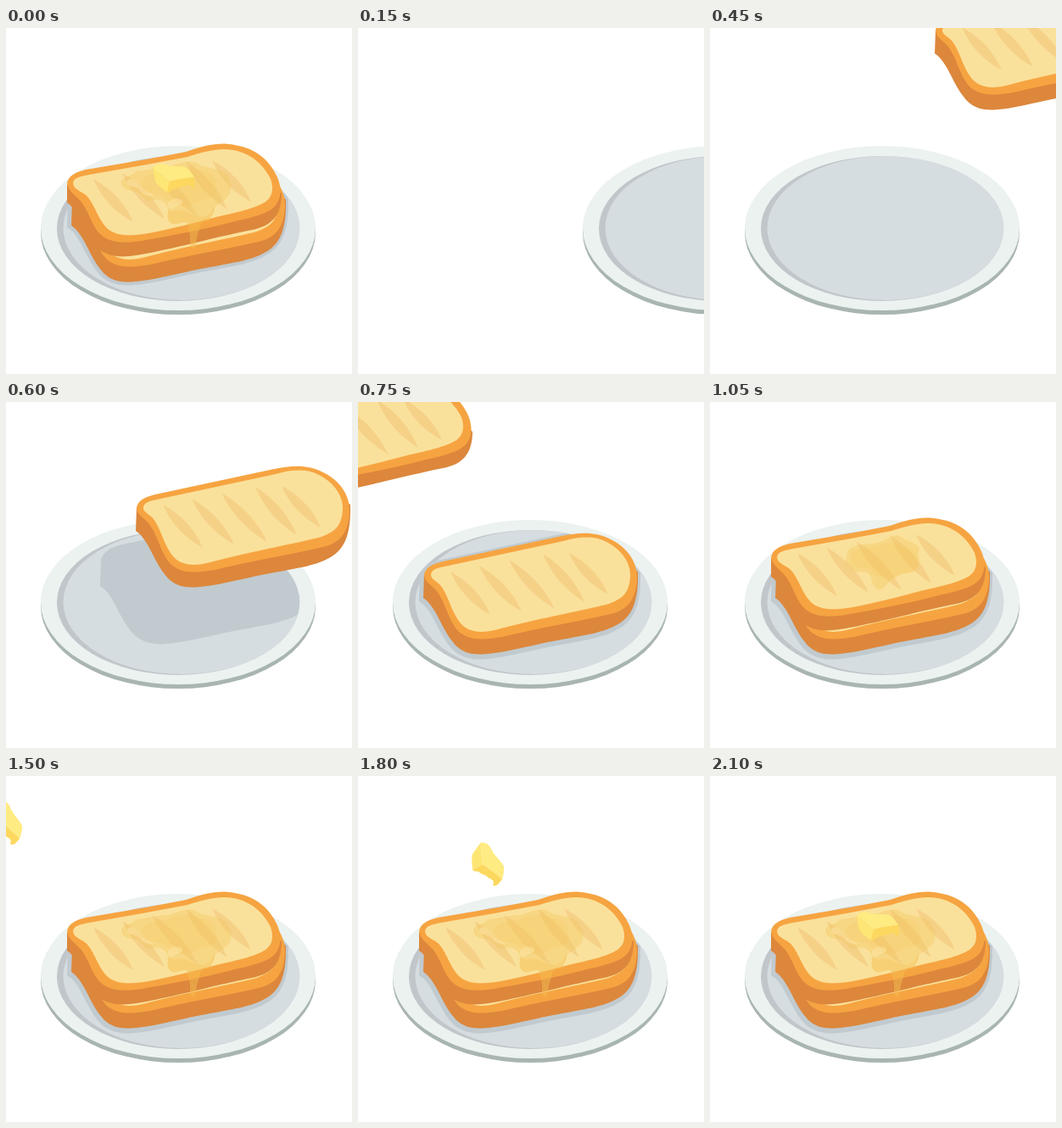
These frames come from a looping animation (408x408 px, 2650 ms). An HTML page with a canvas:

```html
<!DOCTYPE html>
<html lang="en">
<head>
<meta charset="utf-8">
<title>Toast</title>
<style>
html, body { margin: 0; width: 100%; height: 100%; overflow: hidden; background: #fff; }
canvas { display: block; width: 100vw; height: 100vh; }
</style>
</head>
<body>
<canvas id="stage" width="408" height="408"></canvas>
<script>
const ctx = document.getElementById('stage').getContext('2d');
const LOOP = 2650, STEP = 150, LAST = 14;

const lower = {
  crust: new Path2D('M78 204C79 195 88 191 100 188L240 158C262 153 282 153 298 162C317 171 330 189 329 208C328 231 320 243 302 249C270 257 210 267 170 277C145 281 130 281 118 270C107 258 104 240 95 226C89 216 79 214 78 204Z'),
  side: new Path2D('M78 203L77 231C92 241 97 264 111 282C121 296 135 299 152 297C170 296 195 289 230 282C268 275 288 272 303 264C322 255 331 238 330 200L300 180L100 195Z'),
  face: new Path2D('M86 204C86 198 92 196 102 194L242 164C263 158 280 158 293 165C311 174 322 190 321 206C320 226 311 232 296 238C260 247 205 257 165 268C145 273 131 272 121 261C111 249 108 233 100 220C95 211 86 210 86 204Z')
};
const upper = {
  crust: new Path2D('M72 184C73 174 82 170 94 167L165 155L212 146C235 138 252 134 270 138C296 142 312 158 320 176C325 188 325 200 318 209C308 221 285 224 262 230C235 237 195 245 165 250C140 255 122 253 112 244C102 235 100 222 91 208C85 199 75 195 72 184Z'),
  side: new Path2D('M72 185L72 206C86 215 89 238 103 254C113 267 128 271 146 269C185 264 240 248 290 238C312 234 325 222 325 195L300 172L95 178Z'),
  face: new Path2D('M79 183C80 176 88 175 98 173L166 161L214 152C236 145 252 141 268 144C290 148 304 162 312 178C316 190 314 199 306 205C290 215 262 219 240 225C210 233 185 239 162 243C140 246 128 244 119 236C109 226 106 212 97 200C91 192 80 192 79 183Z')
};
const grill = [[109, 200, 156, 251], [143, 193, 193, 247], [178, 186, 232, 244], [218, 179, 267, 236], [249, 178, 295, 227]];

const honey = {
  small: new Path2D('M161 183C162 168 177 168 190 167C205 166 212 157 222 157C230 164 241 164 247 172C244 181 250 189 244 197C239 204 224 201 217 207C209 213 207 220 200 221C192 221 192 212 189 205C184 197 176 204 168 197C162 193 159 189 161 183Z'),
  pool: new Path2D('M136 184C135 174 149 176 153 169C168 168 176 164 192 164C206 158 222 154 229 162C240 166 258 165 263 178C268 187 266 197 256 204C246 209 244 217 237 221C229 224 222 221 214 217C207 213 198 218 191 214C190 207 184 201 174 203C166 207 161 199 155 193C147 192 139 192 136 184Z'),
  inner: new Path2D('M161 182C162 171 179 171 192 169C209 162 221 162 226 168C242 168 249 175 247 186C253 194 244 201 233 202C222 205 219 213 209 210C200 207 194 209 189 201C184 194 177 199 171 195C163 193 160 188 161 182Z'),
  dripShort: new Path2D('M191 214C198 218 207 213 214 217C222 221 229 224 237 221C244 217 244 212 246 211C246 220 241 221 240 227C236 228 232 223 228 227C226 236 217 238 215 229C209 225 201 234 194 230C189 226 191 219 191 214Z'),
  dripLong: new Path2D('M191 214C198 218 207 213 214 217C222 221 229 224 237 221C244 217 244 212 246 211C246 220 241 221 240 227C236 228 232 226 229 233C227 243 225 242 224 256C222 262 217 261 217 253C218 243 215 239 214 230C207 227 201 234 194 230C189 226 191 219 191 214Z'),
  shine: new Path2D('M143 181C141 188 152 186 157 190C161 197 168 200 175 197C164 194 160 187 154 182C150 178 145 176 143 181ZM191 207C193 201 203 199 207 203C212 208 202 208 197 213C192 214 190 211 191 207Z')
};

const butter = {
  top: new Path2D('M-25-12C-22-16-17-18-11-16C-4-13 4-15 14-13C18-10 21-6 24-1C14 0 5 1-5 4Z'),
  left: new Path2D('M-25-12L-5 4L-8 17C-13 13-19 9-22 4Z'),
  front: new Path2D('M-5 4C5 1 15 0 24-1L25 7C24 12 21 13 20 9C17 7 14 9 11 10C7 9 4 13 0 13C-3 13-4 17-8 17Z')
};

// position of each piece per step, from the step it enters
const plateX = { 1: 224, 2: 75 };
const lowerAt = { 0: [0, 2], 3: [188, -201], 4: [76, -79] };
const upperAt = { 5: [-190, -160], 6: [-71, -71] };
const butterAt = { 10: [0, 56, 50], 11: [92, 81, 25], 12: [153, 105, 47], 13: [190, 157, 0] };
const rest = [0, 0];

function fill(color, path) {
  ctx.fillStyle = color;
  ctx.fill(path);
}

function at(x, y, draw) {
  ctx.save();
  ctx.translate(x, y);
  draw();
  ctx.restore();
}

function oval(x, y, rx, ry) {
  const p = new Path2D();
  p.ellipse(x, y, rx, ry, 0, 0, Math.PI * 2);
  return p;
}

const well = oval(203, 236.5, 143, 85.5);

function plate() {
  fill('#a9b5b2', oval(203, 241, 162, 97));
  fill('#ebf2f0', oval(203, 236, 162, 97));
  fill('#c0c6c9', well);
  fill('#d5dde1', oval(207, 236, 139.5, 85));
}

function slice(bread, dx, dy) {
  fill('#dc873c', bread.side);
  fill('#f6a441', bread.crust);
  fill('#fae19b', bread.face);
  ctx.fillStyle = '#f5d188';
  at(dx, dy, () => {
    for (const [x, y, u, v] of grill) {
      const mx = (x + u) / 2, my = (y + v) / 2;
      ctx.beginPath();
      ctx.moveTo(x, y);
      ctx.quadraticCurveTo(mx + 10, my - 7, u, v);
      ctx.quadraticCurveTo(mx - 10, my + 7, x, y);
      ctx.fill();
    }
  });
}

function plateShadow(x, y) {
  ctx.save();
  ctx.clip(well);
  ctx.translate(x - 1, y + 2);
  ctx.strokeStyle = '#c1cacf';
  ctx.lineWidth = 8;
  for (const p of [lower.side, lower.crust]) {
    fill('#c1cacf', p);
    ctx.stroke(p);
  }
  ctx.restore();
}

function sliceShadow(x, y) {
  ctx.save();
  ctx.clip(well);
  ctx.translate(x, y);
  const p = new Path2D(upper.side);
  p.addPath(upper.crust);
  fill('rgba(120,70,20,.16)', p);
  ctx.restore();
}

function syrup(step) {
  const tint = 'rgba(242,198,92,.36)', deep = 'rgba(242,194,88,.2)';
  if (step === 7) {
    fill(tint, honey.small);
    at(21, 19, () => { ctx.scale(0.9, 0.9); fill(deep, honey.inner); });
    return;
  }
  fill(tint, honey.pool);
  fill(deep, honey.inner);
  if (step > 8 || step === 0) {
    fill('rgba(246,190,80,.5)', step === 9 ? honey.dripShort : honey.dripLong);
  }
  fill('rgba(255,236,178,.4)', honey.shine);
}

function pat([x, y, turn]) {
  at(x, y, () => {
    ctx.rotate(turn * Math.PI / 180);
    fill('#feeb82', butter.top);
    fill('#fee674', butter.left);
    fill('#fdd85e', butter.front);
  });
}

function scene(step) {
  const done = step === 0;
  ctx.fillStyle = '#fff';
  ctx.fillRect(0, 0, 408, 408);
  at(plateX[step] || 0, 0, plate);

  if (done || step >= 3) {
    const [x, y] = lowerAt[step] || rest;
    if (step === 4) plateShadow(39, -18);
    else if (step !== 3) plateShadow(0, 0);
    at(x, y, () => slice(lower, 0, 0));
  }
  if (done || step >= 5) {
    const [x, y] = upperAt[step] || rest;
    if (step === 6) sliceShadow(-34, -15);
    at(x, y, () => slice(upper, -6, -22));
  }
  if (done || step >= 7) syrup(step);
  if (done || step >= 10) pat(butterAt[step] || [198, 177, 0]);
}

const start = performance.now();
let shown = -1;
function tick(now) {
  const t = Math.max(0, now - start) % LOOP;
  const step = Math.min(LAST, Math.floor(t / STEP));
  if (step !== shown) scene(shown = step);
  requestAnimationFrame(tick);
}
tick(start);
</script>
</body>
</html>
```
